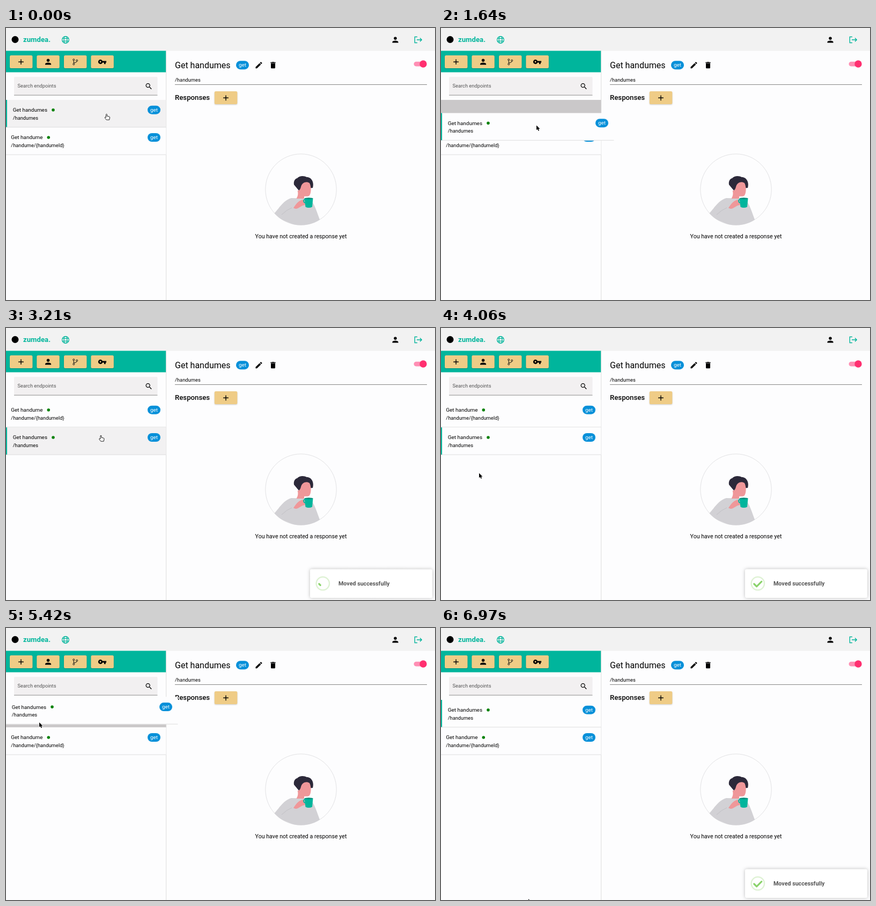
Write an HTML page that moves like this. It is 800 px wide and 507 px high and loops after 7 s.

```html
<!DOCTYPE html>
<html lang="en">
<head>
<meta charset="utf-8">
<title>Reordering endpoints</title>
<style>
  html, body { margin: 0; width: 100%; height: 100%; overflow: hidden; background: #fdfdfe; }
  svg { display: block; width: 800px; height: 507px; font-family: Roboto, Arial, sans-serif; }
  .toast { filter: drop-shadow(0 0 3px #bbb); }
  .btn { filter: drop-shadow(0 1px 1px #0003); }
</style>
</head>
<body>
<svg id="stage" viewBox="0 0 800 507"></svg>
<script>
const LOOP = 7000, ROW_TOP = 134, ROW_H = 51.3, TEAL = '#00b59c';

const icons = {
  add: 'M19 13h-6v6h-2v-6H5v-2h6V5h2v6h6z',
  person: 'M12 12a4 4 0 1 0 0-8 4 4 0 0 0 0 8zm0 2c-2.7 0-8 1.3-8 4v2h16v-2c0-2.7-5.3-4-8-4z',
  key: 'M12.65 10A6 6 0 1 0 12.65 14H17v4h4v-4h2v-4zM7 14a2 2 0 1 1 0-4 2 2 0 0 1 0 4z',
  search: 'M15.5 14h-.8l-.3-.3A6.5 6.5 0 1 0 13.7 14.4l.3.3v.8l5 5 1.5-1.5zm-6 0a4.5 4.5 0 1 1 0-9 4.5 4.5 0 0 1 0 9z',
  edit: 'M3 17.25V21h3.75L17.8 9.94l-3.75-3.75zM20.7 7.04a1 1 0 0 0 0-1.41l-2.34-2.34a1 1 0 0 0-1.4 0l-1.84 1.83 3.75 3.75z',
  trash: 'M6 19a2 2 0 0 0 2 2h8a2 2 0 0 0 2-2V7H6zM19 4h-3.5l-1-1h-5l-1 1H5v2h14z'
};

const icon = (name, x, y, s = .69) =>
  `<path d="${icons[name]}" fill-rule="evenodd" transform="translate(${x} ${y}) scale(${s}) translate(-12 -12)"/>`;
const text = (str, x, y, size, extra = '') => `<text x="${x}" y="${y}" font-size="${size}" ${extra}>${str}</text>`;
const rect = (x, y, w, h, fill, r = 0, extra = '') =>
  `<rect x="${x}" y="${y}" width="${w}" height="${h}" rx="${r}" fill="${fill}" ${extra}/>`;
const button = (x, y) => rect(x, y, 42.5, 24, '#efcc86', 2.5, 'class="btn"');
const badge = (x, y) => rect(x - 12, y - 8, 24, 16, '#0790d9', 8) +
  text('get', x, y + 3.2, 9.8, 'fill="#fff" text-anchor="middle"');

// One list row, drawn from its own top edge
function row(id, title, path, x, dotX, selected) {
  return `<g id="${id}">
    <rect id="${id}Bg" width="298.5" height="${ROW_H}"/>
    <rect id="${id}Line" y="50.3" width="298.5" height="1" fill="#dedede"/>
    ${selected ? rect(0, 0, 2, ROW_H - .7, TEAL) : ''}
    ${text(title, x, 22.2, 9.95)}${text(path, x, 36.6, 9.3)}
    <circle cx="${dotX}" cy="18.7" r="2.8" fill="#078207"/>
    <g id="${id}Badge">${badge(276, 18.7)}</g></g>`;
}

const topBar = rect(0, 0, 800, 42.5, '#f2f2f2') +
  '<circle cx="17" cy="21.5" r="6.5"/>' +
  text('zumdea.', 32, 25.5, 13.2, `font-weight="700" fill="${TEAL}"`) +
  `<g fill="none" stroke="${TEAL}" stroke-width="1.2">
    <circle cx="111" cy="22" r="6.4"/><ellipse cx="111" cy="22" rx="2.9" ry="6.4"/>
    <path d="M105.2 19.7h11.6M105.2 24.3h11.6"/>
    <path d="M767 16.5h-4.7v11h4.7M766 22h9M772 18.8l3.2 3.2-3.2 3.2" stroke-width="1.4"/></g>` +
  icon('person', 726, 22);

const sidebar = rect(0, 42.5, 298.5, 40, TEAL) +
  [7, 57.3, 108, 158.4].map(x => button(x, 51)).join('') +
  icon('add', 28, 63.2) + icon('person', 78.6, 63) + icon('key', 179.5, 63) +
  `<g fill="none" stroke="#111"><circle cx="126.3" cy="59.2" r="1.5"/><circle cx="126.3" cy="67.4" r="1.5"/>
    <circle cx="132.2" cy="60.7" r="1.5"/><path d="M126.3 60.7v5.2M132.2 62.2q0 2.3-5.9 3"/></g>` +
  rect(15, 91, 267.5, 34, '#f2f0f1', 2) + rect(15, 124.7, 267.5, 1, '#8c8c8c') +
  text('Search endpoints', 21.5, 111.3, 9.3, 'fill="#555"') + icon('search', 266.3, 108.7, .64);

const detail = rect(298.2, 42.5, 1, 465, '#dcdcdc') +
  text('Get handumes', 315, 75, 16) + badge(441, 69.2) +
  icon('edit', 471.5, 69.3, .67) + icon('trash', 498, 69.2, .67) +
  rect(760.5, 62.8, 21, 8.6, '#ff8fb4', 4.3) + '<circle cx="778" cy="67" r="6.7" fill="#ff2f70"/>' +
  text('/handumes', 315, 99.8, 9.4) + rect(315, 105, 470, 1, '#858585') +
  text('Responses', 315, 134.4, 13.2, 'font-weight="500"') + button(388.8, 118) + icon('add', 410, 130.3) +
  text('You have not created a response yet', 550, 391.5, 10.65, 'text-anchor="middle"');

const drinker = `<clipPath id="disc"><circle cx="550" cy="301" r="66.5"/></clipPath>
  <circle cx="550" cy="301" r="66.2" fill="none" stroke="#e2e2e4"/>
  <g clip-path="url(#disc)">
    <path d="M496 350C509 337 517 321 532 317L566 318C576 327 580 345 587 362L550 372Z" fill="#d2d1d5"/>
    <path d="M514 348q9-9 19-13" fill="none" stroke="#bbbabf" stroke-width=".8"/>
    <path d="M537 292C536 285 539 281 543 280C547 275 556 275 561 278C570 278 575 288 572 298L560 299 547 304Z" fill="#2c293a"/>
    <path d="M550 296C552 288 560 285 566 289C570 297 569 308 566 312C563 315 559 313 556 314V318H541.500C545 313 545 307 543.500 303C546 304 549 301 550 296Z" fill="#ef9799"/>
    <path d="M536 335.500C542 326 548 319.500 556 320L558 330C551 330 546 337 540 337Z" fill="#ef9799"/>
    <path d="M559 319.500c-5-1-6 6 1 7" fill="none" stroke="${TEAL}" stroke-width="1.8"/>
    <path d="M556.500 317.500H572.500L571 333.500Q564.500 336.500 558.500 333.500Z" fill="${TEAL}"/>
    <ellipse cx="564.500" cy="317.700" rx="8" ry="1.500" fill="#078c7a"/>
  </g>`;

const toastArt = `<g id="toast">${rect(567, 449.5, 228, 53.5, '#fff', 3, 'class="toast"')}
  <circle cx="590.8" cy="476.2" r="12.2" fill="none" stroke="#dff2d5" stroke-width="2.4"/>
  <path id="check" fill="none" stroke="#8ad36b" stroke-width="3.2" stroke-linecap="round" stroke-linejoin="round"/>
  ${text('Moved successfully', 620, 479.8, 10.7, 'font-weight="600" fill="#545454"')}</g>`;

const pointers = `<path id="arrow" d="M0 0V8.800L2 7 3.500 10.300 5.100 9.600 3.700 6.400H6.400Z" stroke="#fff" stroke-width="1.200" paint-order="stroke"/>
  <path id="hand" d="M-1 1Q0-.8 1 1V4.300L4.800 5Q6.200 5.300 6 7L5.200 11.200H-.2L-3.200 7.400Q-3.400 5.600-1.800 6.200L-1 7Z"
    fill="#fff" stroke="#222" stroke-width="1"/>`;

document.getElementById('stage').innerHTML = topBar + sidebar + detail + drinker +
  `<rect id="slot" width="298.5" height="${ROW_H}" fill="#cac8c9"/>` +
  row('single', 'Get handume', '/handume/{handumeId}', 9.3, 79.3, false) +
  row('list', 'Get handumes', '/handumes', 12.7, 88, true) + toastArt + pointers;

const el = id => document.getElementById(id);
const clamp = v => Math.max(0, Math.min(1, v));
const smooth = v => v * v * (3 - 2 * v);
const easeOut = v => 1 - (1 - v) ** 3;
const mix = (a, b, v) => a + (b - a) * v;
const slotY = i => ROW_TOP + i * ROW_H;
const place = (id, x, y) => el(id).setAttribute('transform', `translate(${x} ${y})`);
const show = (id, on) => el(id).setAttribute('visibility', on ? 'visible' : 'hidden');

// Each key: time, then values
function track(keys, t) {
  let i = keys.findIndex(k => k[0] > t);
  if (i < 0) return keys[keys.length - 1].slice(1);
  if (!i) return keys[0].slice(1);
  const a = keys[i - 1], b = keys[i], v = smooth((t - a[0]) / (b[0] - a[0]));
  return a.slice(1).map((n, j) => mix(n, b[j + 1], v));
}

const path = [
  [0, 187.5, 160], [610, 187.5, 160], [780, 178, 157], [880, 178, 157], [1300, 178, 183], [1640, 178, 181.5],
  [1750, 178, 181.5], [2060, 177, 200], [3500, 177, 200], [3780, 98, 277], [4060, 71, 270.5], [4400, 64, 233],
  [4560, 64, 233], [5030, 60.5, 195], [5280, 62, 176], [6390, 62.5, 175.5], [6970, 163, 505]
];
const drags = [
  { start: 880, swap: 1850, drop: 2130, from: 0, to: 1 },
  { start: 4560, swap: 5150, drop: 5420, from: 1, to: 0 }
];
const toasts = [{ start: 2730, end: 4230 }, { start: 5955, end: 7455 }];
const SETTLE = 250;
const wobble = [[0, -6.6, 2], [165, 0, -2], [330, 3.3, 2], [500, 0, 0]];

function drawRows(t, x, y) {
  const drag = drags.find(d => t >= d.start && t < d.drop + SETTLE);
  const done = drags.filter(d => t >= d.drop + SETTLE).pop();
  let at = done ? done.to : 0, listX = 0, listY = slotY(at), singleY = slotY(1 - at);
  if (drag) {
    const { start, swap, drop, from, to } = drag;
    const [x0, y0] = track(path, start), [x1, y1] = track(path, Math.min(t, drop));
    const rest = easeOut(clamp((t - drop) / SETTLE));
    listX = mix(x1 - x0, 0, rest);
    listY = mix(slotY(from) + y1 - y0, slotY(to), rest);
    singleY = mix(slotY(to), slotY(from), easeOut(clamp((t - swap) / SETTLE)));
    place('slot', 0, slotY(t < swap ? from : to));
  }
  show('slot', drag);
  place('list', listX, listY);
  place('single', 0, singleY);
  place('listBadge', drag ? 24 : 0, 0);
  for (const part of ['listBg', 'listLine']) el(part).setAttribute('width', drag ? 322.5 : 298.5);

  const over = !drag && x < 298 && y >= ROW_TOP && y < slotY(2) ? Math.floor((y - ROW_TOP) / ROW_H) : -1;
  const fill = i => over === i ? '#f2f1f2' : '#fdfdfe';
  el('listBg').setAttribute('fill', fill(at));
  el('singleBg').setAttribute('fill', fill(1 - at));
  show('hand', over >= 0);
  show('arrow', over < 0);
}

function drawToast(t) {
  const toast = toasts.find(n => t >= n.start && t < n.end + 100);
  show('toast', toast);
  if (!toast) return;
  const age = t - toast.start, leave = clamp((t - toast.end) / 100);
  const [dy, turn] = track(wobble, age);
  el('toast').setAttribute('transform', `translate(0 ${dy}) rotate(${turn + leave} 681 476)`);
  el('toast').setAttribute('opacity', 1 - leave);
  const tip = clamp((age / 750 - .54) / .2), long = clamp((age / 750 - .68) / .3);
  el('check').setAttribute('d', tip ? `M583.8 477l${4.8 * tip} ${4.8 * tip}` + (long ? `l${9.2 * long} ${-9.2 * long}` : '') : '');
}

function frame() {
  const t = performance.now() % LOOP, [x, y] = track(path, t);
  drawRows(t, x, y);
  drawToast(t);
  place('arrow', x, y);
  place('hand', x, y);
  requestAnimationFrame(frame);
}
frame();
</script>
</body>
</html>
```
